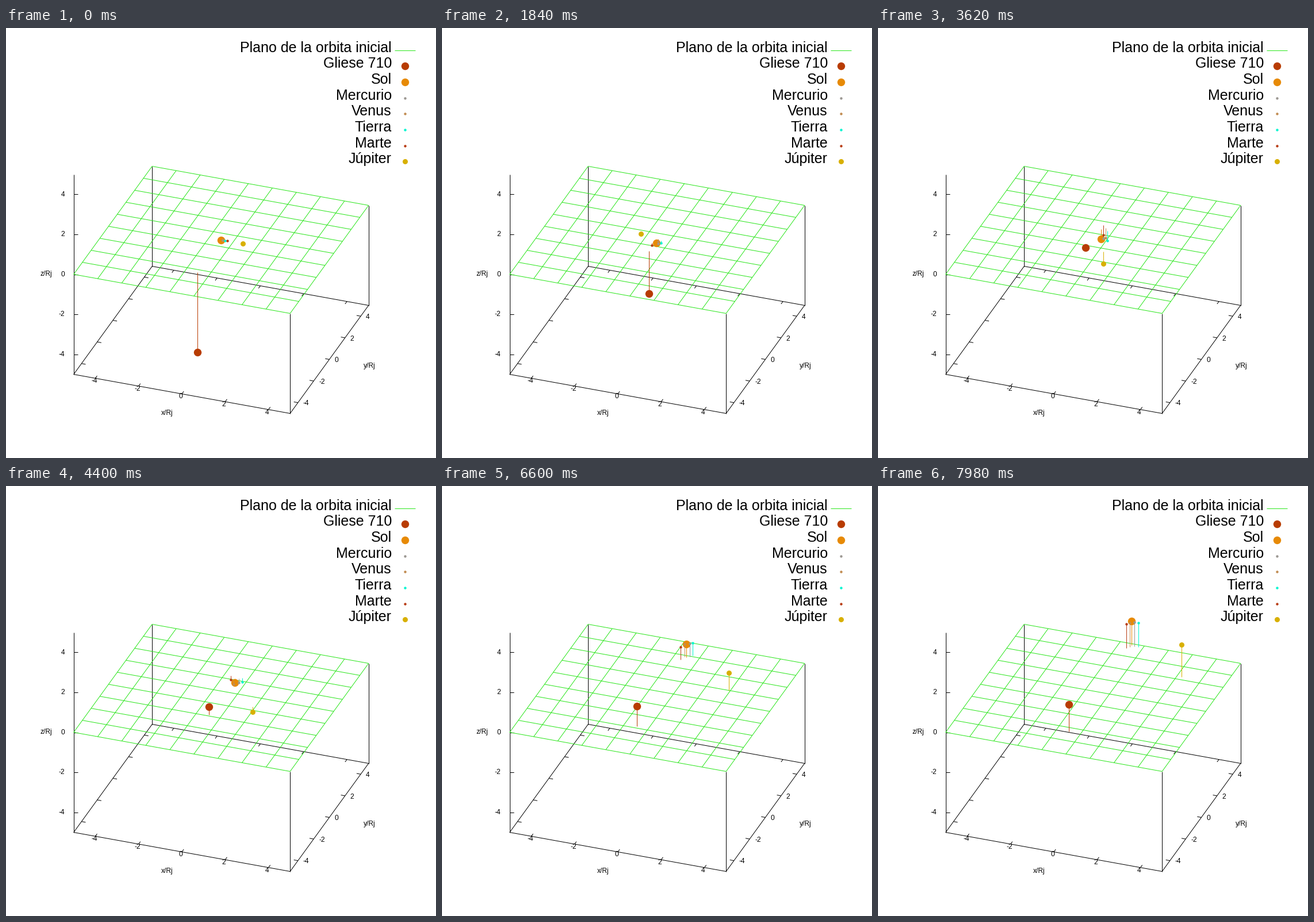
Animation, 748 px wide and 748 px high, one loop 8000 ms. Source, as a matplotlib script:

```python
import numpy as np
import matplotlib.pyplot as plt
from matplotlib.animation import FuncAnimation
from matplotlib.collections import LineCollection

SIZE, DPI = 748, 100
PX = 72 / DPI
FRAMES, STEP = 400, 20
SUBSTEPS = 20

# screen position of the space origin and of the three unit vectors
CENTER = np.array([374.2, 368.5])
AXES = np.array([[37.65, 6.8], [13.65, -18.8], [0, -34.8]])

GM = 2.07           # gravity of the Sun, in Rj^3 / s^2
MASS_RATIO = .6     # passing star against the Sun
FLYBY = 2.78        # closest approach, in s

GREEN = "#2be61c"
BODIES = [
    ("Gliese 710", "#b83c02", 6.7),
    ("Sol", "#e78a06", 6.7),
    ("Mercurio", "#9c9893", 2.2),
    ("Venus", "#c18c52", 2.2),
    ("Tierra", "#00f5d0", 2.2),
    ("Marte", "#b83c14", 2.2),
    ("Júpiter", "#d8b000", 4.5),
]
INNER_RADII = [.0745, .139, .192, .293]


def project(x, y, z=0):
    return CENTER + np.array([x, y, z]) @ AXES


def pull(pos, masses):
    gap = pos[None] - pos[:, None]
    dist = np.sqrt((gap ** 2).sum(-1))
    np.fill_diagonal(dist, 1)
    return (gap * (masses / dist ** 3)[..., None]).sum(1)


def fly_by():
    """Leapfrog paths of the star, the Sun and Jupiter: (frame, body, xyz)."""
    masses = np.array([MASS_RATIO, 1, 0]) * GM
    pos = np.array([[0, -3, -4], [0, 0, 0], [1, 0, 0]], float)
    vel = np.array([[0, 1.0044, .9212], [0, 0, 0], [0, GM ** .5, 0]])
    dt = STEP / 1000 / SUBSTEPS
    out = []
    acc = pull(pos, masses)
    for _ in range(FRAMES):
        out.append(pos.copy())
        for _ in range(SUBSTEPS):
            vel += acc * dt / 2
            pos += vel * dt
            acc = pull(pos, masses)
            vel += acc * dt / 2
    return np.array(out)


def inner_path(radius, sun, t):
    """Circle round the Sun, wider and off centre after the encounter."""
    angle = 2 * np.pi * t / (4.317 * radius ** 1.5)
    stirred = np.clip((t - FLYBY) / .1, 0, 1)
    size = radius * (1 + .3 * stirred)
    ring = np.column_stack([size * np.cos(angle) + .08 * stirred,
                            size * np.sin(angle), 0 * t])
    return sun + ring


times = np.arange(FRAMES) * STEP / 1000
star, sun, jupiter = fly_by().transpose(1, 0, 2)
paths = [star, sun, *(inner_path(r, sun, times) for r in INNER_RADII), jupiter]

plt.rcParams["font.family"] = "Liberation Sans"
fig = plt.figure(figsize=(SIZE / DPI, SIZE / DPI), dpi=DPI, facecolor="white")
ax = fig.add_axes([0, 0, 1, 1])
ax.set_xlim(0, SIZE)
ax.set_ylim(SIZE, 0)
ax.axis("off")


def lines(segments, color, order):
    ax.add_collection(LineCollection(segments, colors=color, linewidths=PX,
                                     zorder=order))


def label(x, y, text, size=12, ha="center"):
    ax.text(x, y, text, fontsize=size * PX, ha=ha, va="baseline")


def dot(x, y, radius, color, order):
    return ax.plot([x], [y], "o", ms=2 * radius * PX, mfc=color, mew=0,
                   zorder=order)[0]


# box: floor, then the four uprights
floor = [(-5, -5), (5, -5), (5, 5), (-5, 5)]
frame = [(project(*a, -5), project(*b, -5))
         for a, b in zip(floor, floor[1:] + floor[:1])]
frame += [(project(x, y, -5), project(x, y, 5 if x == y == -5 else 0))
          for x, y in floor]

# ticks and their numbers
EX, EY, _ = AXES
for n in range(-4, 5, 2):
    front, back = project(n, -5, -5), project(n, 5, -5)
    right, left = project(5, n, -5), project(-5, n, -5)
    up = project(-5, -5, n)
    frame += [(front, front + .23 * EY), (back, back - .23 * EY),
              (right, right - .19 * EX), (left, left + .19 * EX),
              (up, up + [7, 0])]
    label(front[0] - 2, front[1] + 7.8, n)
    label(right[0] + 9, right[1] + 4.6, n, ha="left")
    label(102.5, up[1] + 3.3, n, ha="right")
lines(frame, "black", 1)

label(70, 430.5, "z/Rj")
label(280.5, 673, "x/Rj")
label(632, 591.5, "y/Rj")

# reference plane
grid = []
for s in np.linspace(-5, 5, 10):
    grid += [(project(s, -5), project(s, 5)), (project(-5, s), project(5, s))]
grid.append(((676, 38.5), (712, 38.5)))
lines(grid, GREEN, 2)

# legend
GAP = 27.7
label(671, 41.5, "Plano de la orbita inicial", 25, "right")
for row, (name, color, radius) in enumerate(BODIES, 1):
    label(671, 41.5 + GAP * row, name, 25, "right")
    dot(693.7, 38.5 + GAP * row, radius, color, 3)

stems, dots = [], []
for n, (_, color, radius) in enumerate(BODIES):
    stems.append(ax.plot([], [], color=color, lw=PX, solid_capstyle="butt",
                         zorder=4 + n)[0])
    dots.append(dot(0, 0, radius, color, 4.5 + n))


def update(i):
    for path, stem, mark in zip(paths, stems, dots):
        x, y, z = path[i]
        foot, top = project(x, y), project(x, y, z)
        stem.set_data(*zip(foot, top))
        mark.set_data(*top[:, None])
    return stems + dots


anim = FuncAnimation(fig, update, frames=FRAMES, interval=STEP,
                     init_func=lambda: update(0), repeat=True,
                     repeat_delay=0, blit=False)
plt.show()
```
